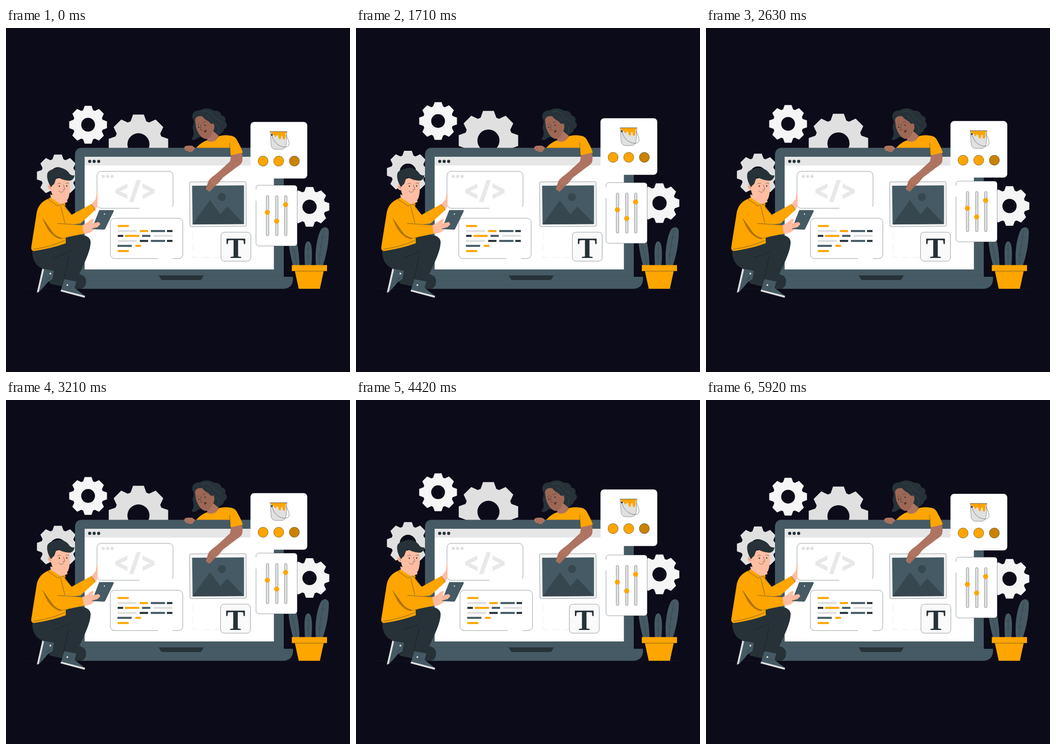
These frames come from a looping animation (748x748 px, 5.96 s). An HTML page:

```html
<!DOCTYPE html>
<html lang="en">
<head>
<meta charset="utf-8">
<title>Web design team</title>
<style>
html, body { margin: 0; width: 100%; height: 100%; overflow: hidden; background: #0c0b19 }
svg { display: block; width: 100vw; height: 100vh }
.card { fill: #fff; stroke: #263238; stroke-width: .5 }
.line { fill: none; stroke: #263238; stroke-width: .6; stroke-linecap: round; stroke-linejoin: round }
.dark { fill: #263238 }
.teal { fill: #455a64 }
.gold { fill: #ffa500 }
.pale { fill: #e0e0e0 }
.skin { fill: #ffbda2 }
.tan { fill: #ae7461 }
</style>
</head>
<body>
<svg viewBox="0 0 748 748">
  <path class="line" d="M44 567.4H702" opacity=".6"/>

  <g id="gears" class="float"></g>

  <!-- plant -->
  <g>
    <path class="teal" d="M624 516C617 490 609 452 619 441C631 438 638 490 638 516Z"/>
    <path class="teal" d="M650 516C649 495 647 464 657 464C667 464 666 495 664 516Z"/>
    <path class="teal" d="M674 516C671 490 676 455 684 440C689 430 702 431 702 443C702 464 697 495 689 516Z"/>
    <path class="line" d="M622 468Q628 490 632 515M657 469V515M692 439Q683 474 681 515" opacity=".8"/>
    <path class="line" d="M653 478l4 5 4-5M653 494l4 5 4-5M687 452l2 6 6-4M683 471l2 6 6-4M680 490l2 6 6-4" opacity=".6"/>
    <path class="gold" d="M628 528H691L682.500 567H636.500Z"/>
    <path class="gold" d="M621.500 515.500H698V528.500H621.500Z"/>
    <path class="line" d="M628 528.700H691"/>
  </g>

  <!-- woman behind the lid -->
  <g>
    <path class="dark" d="M407 199C401 188 409 178 422 179C429 173 445 174 452 180C462 178 469 186 468 190C476 191 480 198 476 203C483 208 481 217 474 220C474 227 466 228 463 234C457 237 449 236 444 234L418 238C415 241 408 247 403 241C408 237 409 230 407 222C403 214 411 207 407 199Z"/>
    <path class="line" d="M426 183C438 178 447 184 451 192S465 198 466 206M437 191C446 195 449 206 457 210S464 224 460 230" style="stroke:#455a64"/>
    <path class="gold" d="M411 263C421 252 430 246 441 243Q455 248 463 235C477 232 490 233 497 238L504 264Z"/>
    <path class="tan" d="M437 241L450 224L462 234C461 244 449 250 439 246Z"/>
    <path d="M411 200C412 193 419 190 427 192C432 200 441 201 444 207C448 210 450 206 452 209C455 215 452 224 448 228C447 236 440 242 433 241C423 239 416 226 413 215Z" fill="#9d6755"/>
    <path class="line" d="M424 209L423 222L428 222M416 211L421 208M428 206L435 203"/>
    <circle class="dark" cx="419" cy="216" r="1.400"/><circle class="dark" cx="433" cy="211.500" r="1.400"/>
    <path d="M430 224L436 221Q437 226 432 228Z" fill="#5d352e"/>
  </g>

  <!-- laptop -->
  <path class="teal" d="M165 260.400H590Q604 260.400 604 275V541H624V548Q622 567 602 567H150V275Q151 260.400 165 260.400Z"/>
  <path fill="#fff" d="M171 280H582.500V525H171Z"/>
  <path fill="#e6e6e6" d="M171 280H582.500V299H171Z"/>
  <path class="line" d="M171 538H604" opacity=".35"/>
  <path class="dark" d="M332 538H430L426 545Q425 548 421 548H341Q337 548 336 545Z"/>
  <circle class="dark" cx="182" cy="290" r="3.400"/><circle class="dark" cx="191.700" cy="290" r="3.400"/><circle class="dark" cx="201.500" cy="290" r="3.400"/>

  <!-- markup window -->
  <rect class="card" x="197.800" y="311.700" width="165.400" height="80.300" rx="9" stroke-dasharray="230 72 999"/>
  <g class="pale"><circle cx="211.500" cy="322.700" r="3.400"/><circle cx="221" cy="322.700" r="3.400"/><circle cx="230.600" cy="322.700" r="3.400"/></g>
  <path fill="#e8e8e8" d="M264 338V347.500L248 355L264 362.500V372L238 359V351ZM297 338V347.500L313 355L297 362.500V372L323 359V351ZM284 330.500H293.500L277 378.500H267.500Z"/>

  <g id="code">
    <rect class="card" x="227" y="413.700" width="157.500" height="87.600" rx="9" stroke-dasharray="250 32 999"/>
  </g>

  <!-- picture and drop zone -->
  <path class="line" d="M406.500 444V499H467" stroke-dasharray="16 9" style="stroke:#dcdcdc"/>
  <path d="M402 334.700L519 334Q522 334 522 337L522.500 428Q522.500 431 520 431L403 432Q400 432 400 429L399 338Q399 334.700 402 334.700Z" fill="#f5f5f5" stroke="#263238" stroke-width=".5"/>
  <path class="teal" d="M404.700 343L517.500 342.300V426.200L405.700 427.200Z"/>
  <g fill="#37474f"><circle cx="469.500" cy="367.500" r="8.700"/><path d="M405.700 427L443.500 374L466 405L481.500 388L517.500 426.200Z"/></g>

  <g id="type">
    <rect class="card" x="467.500" y="444" width="65" height="63" rx="8" style="fill:#fafafa"/>
    <text x="500" y="500" text-anchor="middle" class="dark" font-family="'Liberation Serif', serif" font-weight="700" font-size="64">T</text>
  </g>

  <!-- woman's arms -->
  <path class="tan" d="M490 275L513 271Q516 288 512 294Q508 299 501 303L472 325C466 331 464 337 457 341L446 353Q442 358 440 354L436 352Q434 350 436 345L440 333C445 325 453 321 462 313L487 290Z"/>
  <path class="line" d="M440 352L448 340M444 354L452 342M436 347L444 336" style="stroke:#7d4a3d"/>
  <path class="gold" d="M480 235C493 232 500 237 504 247Q511 259 515 271L488 277L486 250Z"/>
  <path class="line" d="M488 277L486.500 250"/>
  <path class="tan" d="M411 261Q406 255 400 256Q391 255 388 259Q386 263 390 265Q391 269 395 267Q398 271 401 269Q406 271 406 267L411 262Z"/>
  <path class="line" d="M391 265L394 260M396 268L399 262M402 268L404 263" style="stroke:#7d4a3d"/>

  <g id="sliders">
    <rect class="card" x="543.700" y="342" width="89.500" height="132" rx="6" stroke-dasharray="395 24 999"/>
  </g>

  <g id="paint" class="float">
    <rect x="531.600" y="204.400" width="123.500" height="123" rx="8" fill="#fff"/>
    <path d="M574.500 225.300H610.800L609.500 252Q608 264 598 264H588Q578 264 576.500 255Z" fill="#e0e0e0" stroke="#263238" stroke-width=".5"/>
    <path class="gold" d="M575 225.500H610.500L607.500 231Q608 242 604.500 243Q601 243 601.500 235Q599 232 598 237Q598 243 595 242Q592 241 592 235Q589 231 587.500 236Q584 239 583 233Q580 232 577 230Z"/>
    <path class="line" d="M574 225.300H611M578 233C582 249 594 259 607 259C621 258 615 245 609 233"/>
    <circle class="dark" cx="578" cy="232.700" r="2"/>
  </g>

  <!-- man -->
  <g>
    <path class="skin" d="M186 383L195 372L197 358Q199 357 199 362V384Q198 394 192 397Z"/>
    <path class="gold" d="M118 384L127 386L143 406L185 383Q191 388 194 396L162 425L125 430Z"/>
    <path class="line" d="M128 390L143 406M185 383Q191 388 194 396"/>
    <path class="dark" d="M70 502L150 495L145 536Q171 532 174 548Q175 567 160 567H146L96 556L78 524Z"/>
    <path class="pale" d="M79 523L85 526L73 573L67 575.500Z"/>
    <path class="teal" d="M83 524L104 528L101 546Q90 552 85 560L71 575Z"/>
    <path class="teal" d="M127 546L153 551L149 565L172 583L119.500 570Z"/>
    <path class="pale" d="M120 569L172 582.500L171 586.500L118.500 572.500Z"/>
    <path class="line" d="M97 541l-7 3M95 545l-7 4M138 558l-6 6M142 562l-5 5"/>
    <circle class="pale" cx="96.500" cy="534" r="2"/><circle class="pale" cx="133.500" cy="559" r="2"/>
    <path class="dark" d="M57 485C84 480 109 469 129 455C148 446 183 446 184 465C184 490 163 523 153 551L126 546L137 497C126 516 108 524 82 523C65 520 57 503 57 485Z"/>
    <path class="line" d="M104 499Q126 493 140 485M137 497L126 546" style="stroke:#11171a"/>
    <path class="gold" d="M97 369C79 376 71 384 67 400L55 476Q54 484 60 485Q101 479 130 468L128 383Z"/>
    <path d="M80 414Q92 452 118 459L135 455Z" fill="#b57600"/>
    <path class="gold" d="M79 402C92 390 105 398 111 425L165 428Q172 428 171 447L122 457Q108 456 97 439L78 412Z"/>
    <path class="line" d="M80 415L98 440Q107 454 121 457M112 425L166 428.500Q171 437 170 447M60 481Q97 476 128 462M118 383L128 424"/>
    <path class="skin" d="M166 429Q177 424 184 417Q190 413 191 418L188 424L201 423Q206 425 204 428L202 432L191 439Q182 448 169 447Z"/>
    <path class="skin" d="M96 362L98 370L118 386L134 378L130 368Z"/>
    <path class="gold" d="M96 368L92 373L113 387L121 383L130 386L128 380L119 383Z"/>
    <path class="line" d="M96 368L92 373L113 387L121 383L130 386"/>
    <path class="skin" d="M98 330L136 322C139 338 140 354 137 365C134 378 127 381 119 378C109 375 100 366 98 353Q91 352 90 345Q91 337 98 340Z"/>
    <path class="dark" d="M98 346C91 336 88 324 90 316C93 308 104 307 109 305C119 302 132 306 139 318Q145 322 149 320Q148 329 140 332C128 332 118 328 112 324C106 329 107 340 102 341Z"/>
    <path class="line" d="M125 341L128 351L123 352M112 339Q116 336 119 338M130 338Q134 336 137 338M115 354Q120 361 126 354M93 345Q96 345 97 349"/>
    <circle class="dark" cx="116" cy="344" r="1.400"/><circle class="dark" cx="132" cy="343.500" r="1.400"/>
    <path class="dark" d="M203 396H230L210 438L187 437Z"/>
    <path class="teal" d="M205 396H232Q235 396 234 399L216 436Q215 439 211 438.500L190 437Q187 437 188 434L202 398Q203 396 205 396Z"/>
    <circle cx="214" cy="404.500" r="1.300" fill="#fff"/>
    <path class="skin" d="M180 427L201 422Q206 424 204 428L199 433L187 436Z"/>
    <path class="line" d="M188 428L203 425M189 432L202 430" style="stroke:#d98f78"/>
  </g>
</svg>
<script>
const $ = id => document.getElementById(id);
const add = (id, markup) => $(id).insertAdjacentHTML('beforeend', markup);

// Eight-toothed gear with a see-through hub.
function gear(x, y, r, hub, fill) {
  const pts = [];
  for (let i = 0; i < 8; i++)
    for (const [da, k] of [[-.33, .81], [-.18, 1.01], [.18, 1.01], [.33, .81]]) {
      const a = i * Math.PI / 4 + da, q = r * k;
      pts.push((x + q * Math.sin(a)).toFixed(2) + ' ' + (y - q * Math.cos(a)).toFixed(2));
    }
  const arc = `a${hub} ${hub} 0 1 0 `;
  add('gears', `<path fill="${fill}" fill-rule="evenodd" d="M${pts.join('L')}ZM${x - hub} ${y}${arc}${2 * hub} 0${arc}${-2 * hub} 0Z"/>`);
}
gear(178.5, 210.5, 41.3, 15, '#f5f5f5');
gear(288, 253, 65, 24, '#e0e0e0');
gear(113, 321, 46, 18, '#e0e0e0');
gear(660, 389, 43.3, 15.5, '#f5f5f5');

// Code rows: middle, then class, left edge and width of each bar
const rows = [
  [430.5, 'gold 243 24'],
  [441.5, 'pale 243 41', 'gold 291 18', 'teal 315 31', 'dark 350 12'],
  [452, 'dark 243 12', 'gold 259 31', 'teal 296 18', 'pale 321 41'],
  [463, 'pale 243 41', 'dark 291 18', 'teal 315 31', 'dark 350 12'],
  [473.7, 'teal 242.5 31', 'gold 281.5 12'],
  [485, 'gold 243 24']
];
for (const [y, ...bars] of rows)
  for (const bar of bars) {
    const [cls, x, w] = bar.split(' ');
    add('code', `<rect class="${cls}" x="${x}" y="${y - 2.2}" width="${w}" height="4.400"/>`);
  }

for (const [x, y] of [[568.7, 401], [588.8, 420], [608.3, 384]])
  add('sliders', `<rect class="pale" x="${x - 2.8}" y="364.500" width="5.600" height="87.500" rx="2.800" stroke="#263238" stroke-width=".5"/>
    <circle class="gold" cx="${x - .3}" cy="${y}" r="5.500"/>`);

[559, 593, 627].forEach((x, i) =>
  add('paint', `<circle cx="${x}" cy="289.500" r="11" fill="${i < 2 ? '#ffa500' : '#c98200'}" stroke="#263238" stroke-width=".6"/>`));

const LOOP = 5960, CYCLE = 2950;
const jolts = [0, -1, 2, -4, 4, -4, 4, -4, 2, -1, 0];
const lift = p => -10 * (1 - Math.abs(2 * p - 1));
function shake(p) {
  const k = Math.floor(p * 10);
  return jolts[k] + (jolts[k + 1] - jolts[k]) * (p * 10 - k);
}
const move = (el, x, y) => el.setAttribute('transform', `translate(${x} ${y})`);
const floats = document.querySelectorAll('.float');
const start = performance.now();

function draw() {
  const t = (performance.now() - start) % LOOP + 20;
  const fast = t / CYCLE % 1, slow = t / (2 * CYCLE) % 1;
  floats.forEach(el => move(el, 0, lift(fast)));
  move($('sliders'), 0, lift(slow));
  move($('type'), shake(fast), 0);
  move($('code'), shake(slow), 0);
  requestAnimationFrame(draw);
}
draw();
</script>
</body>
</html>
```
